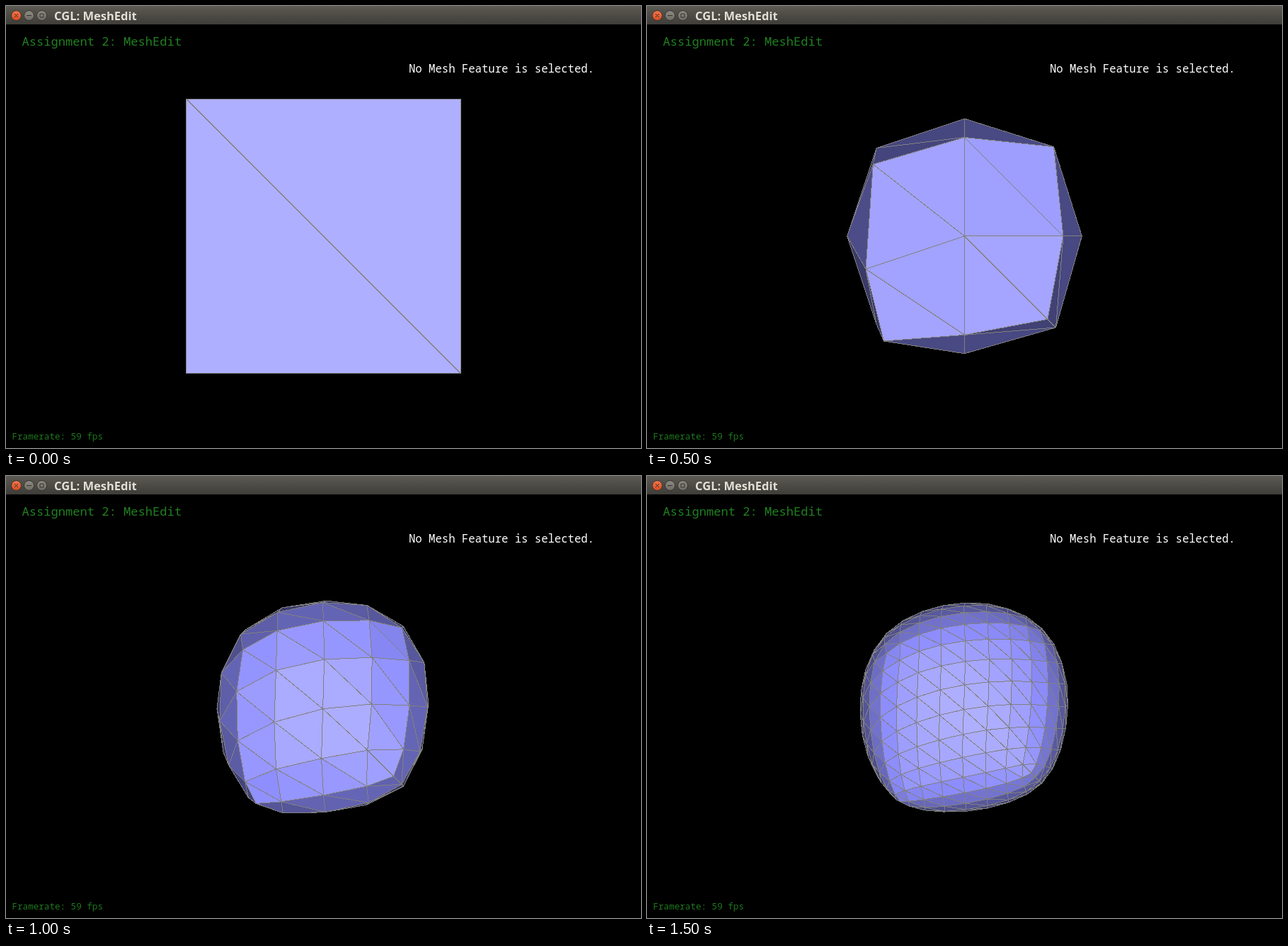
Write an HTML page that moves like this. It is 897 by 624 pixels and loops after 2 s.

```html
<!DOCTYPE html>
<html lang="en">
<head>
<meta charset="utf-8">
<title>CGL: MeshEdit</title>
<style>
html, body { margin: 0; width: 100%; height: 100%; overflow: hidden; background: #000; }
svg { display: block; width: 897px; height: 624px; }
.mono { font-family: "Roboto Mono", "Noto Sans Mono", "DejaVu Sans Mono", monospace; white-space: pre; }
.title { font: bold 16.5px "Open Sans", "Noto Sans", sans-serif; fill: #e2dfd6; }
.mesh { stroke: #808080; stroke-width: 1; stroke-linejoin: bevel; shape-rendering: crispEdges; }
</style>
</head>
<body>
<svg viewBox="0 0 897 624">
  <defs>
    <linearGradient id="bar" x2="0" y2="1">
      <stop offset="0" stop-color="#5c5a53"/>
      <stop offset="1" stop-color="#3e3d38"/>
    </linearGradient>
    <linearGradient id="close" x2="0" y2="1">
      <stop offset="0" stop-color="#f2774c"/>
      <stop offset="1" stop-color="#dc4b20"/>
    </linearGradient>
    <linearGradient id="knob" x2="0" y2="1">
      <stop offset="0" stop-color="#8d8b82"/>
      <stop offset="1" stop-color="#6d6b64"/>
    </linearGradient>
  </defs>
  <rect width="897" height="624"/>
  <rect width="897" height="26" fill="url(#bar)"/>
  <g stroke="#33322e" fill="url(#knob)">
    <circle cx="14.5" cy="13.5" r="7" fill="url(#close)"/>
    <circle cx="32.5" cy="13.5" r="7"/>
    <circle cx="50.5" cy="13.5" r="7"/>
    <path d="M12 11l5 5m0-5l-5 5M29 13.5h7M48 11h5v5h-5z" fill="none"/>
  </g>
  <text class="title" x="68" y="19.5">CGL: MeshEdit</text>
  <g class="mono">
    <text x="22.5" y="56" font-size="17.1" fill="#208020">Assignment 2: MeshEdit</text>
    <text x="569" y="93.5" font-size="15.6" fill="#fff">No Mesh Feature is selected.</text>
    <text x="8.5" y="612" font-size="12.6" fill="#1e781e">Framerate: 59 fps</text>
  </g>
  <g id="stage"></g>
</svg>
<script>
const STEP = 500, LEVELS = 4;
const CX = 448.5, CY = 324.9, FOCAL = 1149, EYE = 4 * Math.sqrt(3);

const sub = (a, b) => a.map((v, i) => v - b[i]);
const dot = (a, b) => a.reduce((s, v, i) => s + v * b[i], 0);
const cross = (a, b) => [
  a[1] * b[2] - a[2] * b[1],
  a[2] * b[0] - a[0] * b[2],
  a[0] * b[1] - a[1] * b[0]
];
const unit = a => a.map(v => v / Math.hypot(...a));
const sum = list => [0, 1, 2].map(i => list.reduce((s, p) => s + p[i], 0));
const blend = (a, s, b, t) => a.map((v, i) => v * s + b[i] * t);

// Corner index bits give the signs of x, y and z.
const cube = {
  points: Array.from({ length: 8 }, (_, i) => [0, 1, 2].map(b => (i >> b & 1) * 2 - 1)),
  faces: ["645", "657", "672", "732", "751", "713", "401", "415", "620", "604", "231", "210"]
    .map(f => [...f].map(Number))
};

// One step of Loop subdivision.
function subdivide({ points, faces }) {
  const edges = new Map();
  const near = points.map(() => new Set());
  const key = (a, b) => Math.min(a, b) + "-" + Math.max(a, b);
  for (const f of faces) {
    f.forEach((a, i) => {
      const b = f[(i + 1) % 3], c = f[(i + 2) % 3], k = key(a, b);
      if (!edges.has(k)) edges.set(k, { ends: [a, b], across: [] });
      edges.get(k).across.push(c);
      near[a].add(b);
      near[b].add(a);
    });
  }
  const pick = ids => sum([...ids].map(i => points[i]));
  const out = points.map((p, i) => {
    const n = near[i].size, u = n === 3 ? 3 / 16 : 3 / (8 * n);
    return blend(p, 1 - n * u, pick(near[i]), u);
  });
  for (const e of edges.values()) {
    e.id = out.push(blend(pick(e.ends), 3 / 8, pick(e.across), 1 / 8)) - 1;
  }
  const mid = (a, b) => edges.get(key(a, b)).id;
  return {
    points: out,
    faces: faces.flatMap(([a, b, c]) => {
      const ab = mid(a, b), bc = mid(b, c), ca = mid(c, a);
      return [[a, ab, ca], [ab, b, bc], [ca, bc, c], [ab, bc, ca]];
    })
  };
}

function project([x, y, z]) {
  const s = FOCAL / (EYE - z);
  return (CX + x * s).toFixed(2) + "," + (CY - y * s).toFixed(2);
}

function shade(light) {
  const v = 49 + 126 * light;
  return `rgb(${Math.round(v)},${Math.round(v)},${Math.min(255, Math.round(v * 1.8))})`;
}

function render({ points, faces }) {
  return faces.map(f => {
    const tri = f.map(i => points[i]);
    const center = sum(tri).map(v => v / 3);
    const normal = unit(cross(sub(tri[1], tri[0]), sub(tri[2], tri[0])));
    const light = dot(normal, unit(sub([0, 0, EYE], center)));
    return { tri, light, depth: center[2] };
  })
    .filter(t => t.light > 0)
    .sort((a, b) => a.depth - b.depth)
    .map(t => `<polygon points="${t.tri.map(project).join(" ")}" fill="${shade(t.light)}"/>`)
    .join("");
}

const stage = document.getElementById("stage");
let mesh = cube, markup = "";
for (let i = 0; i < LEVELS; i++) {
  markup += `<g class="mesh" display="none">${render(mesh)}</g>`;
  if (i < LEVELS - 1) mesh = subdivide(mesh);
}
stage.innerHTML = markup;
const layers = [...stage.children];

let shown = -1;
function draw(ms) {
  const level = Math.floor(ms / STEP) % LEVELS;
  if (level === shown) return;
  shown = level;
  layers.forEach((g, i) => g.setAttribute("display", i === level ? "inline" : "none"));
}

const start = performance.now();
function tick() {
  draw(performance.now() - start);
  requestAnimationFrame(tick);
}
tick();
</script>
</body>
</html>
```
